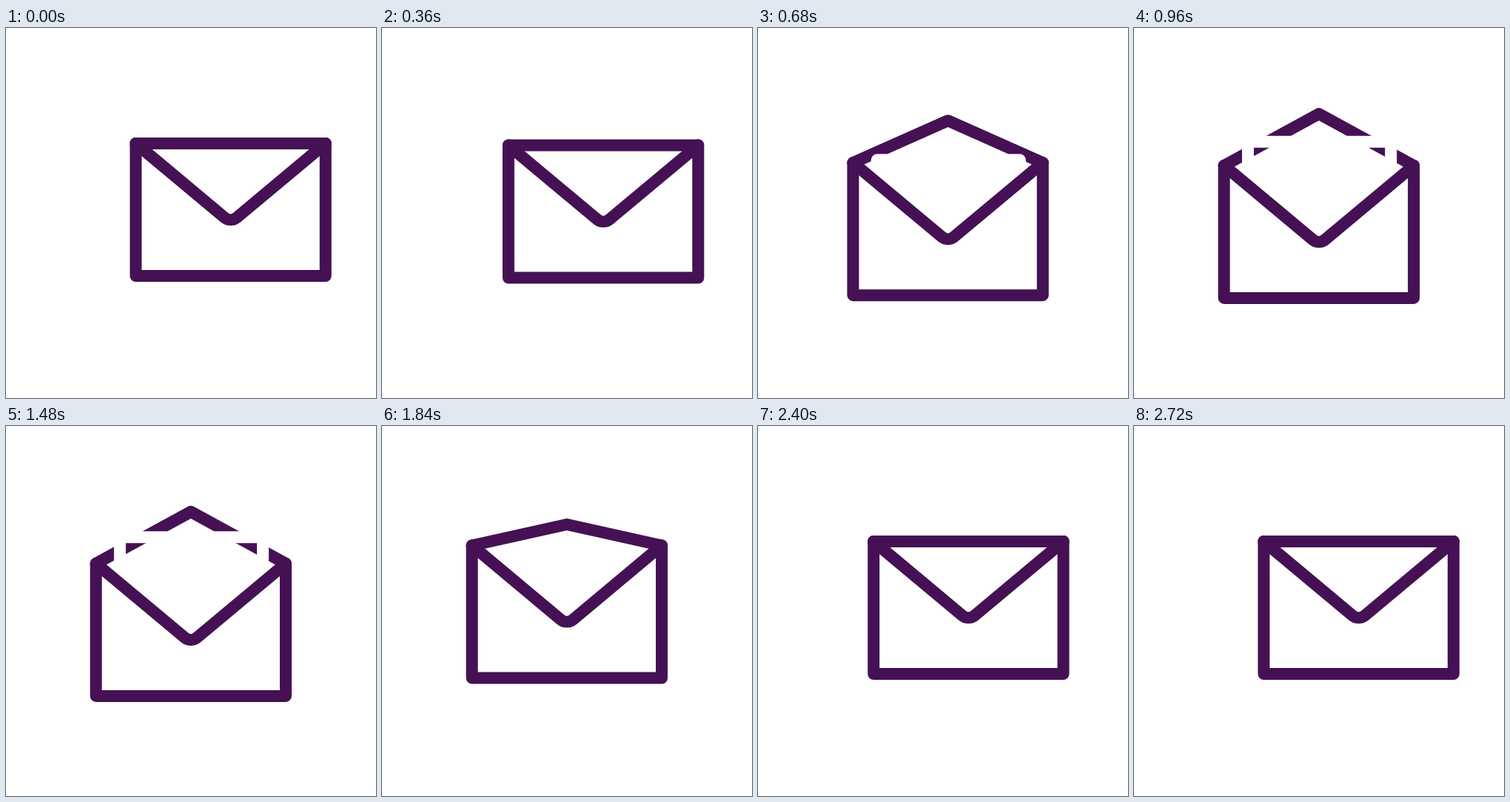
Recreate the animation shown at these times as an HTML page with a canvas. Size 500x500 px, loop 3000 ms.

```html
<!DOCTYPE html>
<html lang="en">
<head>
<meta charset="utf-8">
<title>Envelope</title>
<style>
  html, body { margin: 0; width: 100%; height: 100%; overflow: hidden; background: #fff; }
  canvas { display: block; width: 500px; height: 500px; }
</style>
</head>
<body>
<canvas id="stage" width="500" height="500"></canvas>
<script>
const ctx = document.getElementById('stage').getContext('2d');
const LOOP = 3000, STEP = 40;
const INK = '#451154', PAPER = '#fff';
const WIDTH = 256.4, HEIGHT = 179;

const smooth = s => s * s * (3 - 2 * s);

// cubic-bezier(a, 0, b, 1), solved by bisection
const easing = (a, b) => x => {
  let low = 0, high = 1;
  for (let i = 0; i < 24; i++) {
    const s = (low + high) / 2;
    const at = 3 * a * s * (1 - s) ** 2 + 3 * b * s * s * (1 - s) + s ** 3;
    if (at < x) low = s; else high = s;
  }
  return smooth(low);
};
const arrive = easing(0.6, 0.2);
const unfold = easing(0.4, 0.2);
const glide = easing(0.6, 0.33);

function phase(t, start, end, ease) {
  const x = Math.min(1, Math.max(0, (t - start) / (end - start)));
  return x === 0 || x === 1 ? x : ease(x);
}

function line(color, points) {
  ctx.strokeStyle = color;
  ctx.beginPath();
  points.forEach(([x, y]) => ctx.lineTo(x, y));
  ctx.stroke();
}

function draw(time) {
  const t = Math.floor(time % LOOP / STEP) * STEP;
  const moved = phase(t, 160, 1000, arrive);
  const left = 175.4 - 53.8 * (moved - phase(t, 2040, 2720, glide));
  const top = 156 + 30 * (moved - phase(t, 1440, 2080, glide));
  const rise = 70 * (phase(t, 360, 960, unfold) - phase(t, 1480, 2120, smooth));
  const letterY = top + 17 - 53 * (phase(t, 280, 1200, glide) - phase(t, 1440, 2000, glide));
  const right = left + WIDTH, bottom = top + HEIGHT, middle = left + WIDTH / 2;

  ctx.fillStyle = PAPER;
  ctx.fillRect(0, 0, 500, 500);
  ctx.lineWidth = 16;
  ctx.lineCap = ctx.lineJoin = 'round';

  line(INK, [[left, top], [middle, top - rise], [right, top]]);

  const letterLeft = middle + 0.7 - 96.6, letterRight = middle + 0.7 + 96.6;
  line(PAPER, [[letterLeft, top + 60], [letterLeft, letterY], [letterRight, letterY], [letterRight, top + 60]]);

  line(INK, [[left, top], [left, bottom], [right, bottom], [right, top]]);

  ctx.beginPath();
  ctx.moveTo(left, top);
  ctx.arcTo(middle, top + 107, right, top, 13);
  ctx.lineTo(right, top);
  ctx.stroke();
}

const begin = performance.now();
function tick() {
  draw(performance.now() - begin);
  requestAnimationFrame(tick);
}
tick();
</script>
</body>
</html>
```
